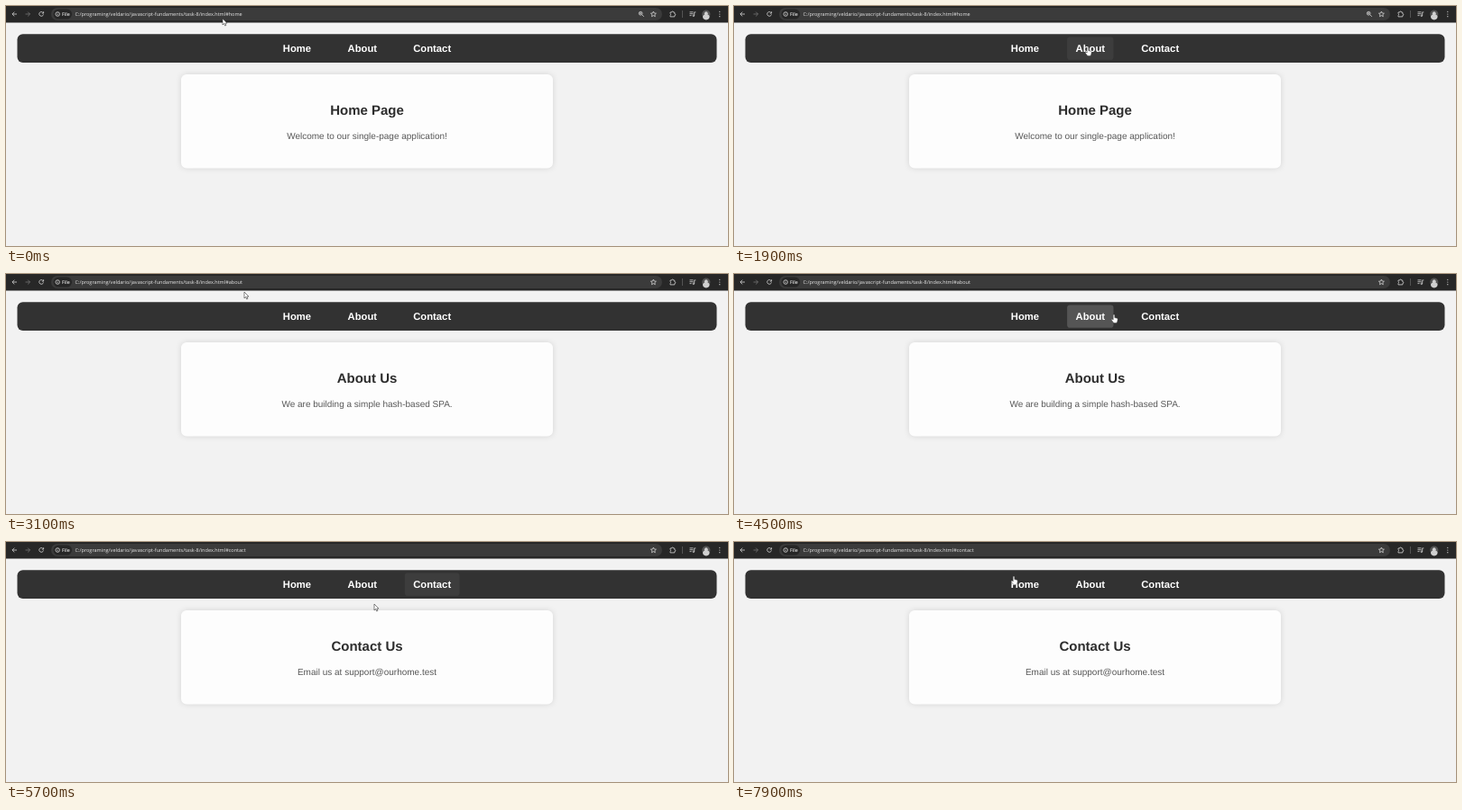
Write an HTML page that moves like this. It is 800 px wide and 267 px high and loops after 8 s.

```html
<!DOCTYPE html>
<html lang="en">
<head>
<meta charset="utf-8">
<title>Single-page application</title>
<style>
html, body { margin: 0; height: 100%; overflow: hidden; background: #f2f2f2; }
svg { display: block; width: 800px; height: 267px; text-rendering: geometricPrecision; }
text { font-family: "Liberation Sans", Arial, sans-serif; text-anchor: middle; }
.ui text { font-family: "Open Sans", "Noto Sans", sans-serif; text-anchor: start; fill: #e6e6e6; }
.icon { fill: none; stroke: #d6d6d6; stroke-width: .8; }
.link text { font-size: 11.25px; font-weight: bold; fill: #fff; }
.card { fill: #fdfdfd; filter: drop-shadow(0 0 3px rgba(0, 0, 0, .12)); }
#title { font-size: 15px; font-weight: bold; fill: #2d2d2d; }
#body { font-size: 10px; fill: #585858; }
#arrow, #hand { stroke-linejoin: round; }
</style>
</head>
<body>
<svg viewBox="0 0 800 267">
  <rect width="800" height="267" fill="#f2f2f2"/>

  <g class="ui">
    <rect width="800" height="18.5" fill="#272727"/>
    <rect x="50" y="2" width="677" height="14" rx="7" fill="#3b3b3b"/>
    <rect x="52.5" y="3.5" width="20.5" height="11" rx="5.5" fill="#262626"/>
    <text x="62" y="10.8" font-size="5.3" font-weight="600">File</text>
    <text id="url" x="76.5" y="10.9" font-size="5.54"></text>
    <g class="icon">
      <path d="M12 9H7M9.3 6.6 6.9 9l2.4 2.4"/>
      <path d="M21.5 9h5M24.2 6.6 26.6 9l-2.4 2.4" stroke="#777"/>
      <path d="M41.2 7.6A2.4 2.4 0 1 0 41.5 9.4M41.6 6.2v1.9h-1.9"/>
      <circle cx="57.2" cy="9" r="2.3"/>
      <path d="M57.2 8.7v1.6M57.2 7.5v.6"/>
      <g id="zoom"><circle cx="703.2" cy="8.2" r="1.9"/><path d="M704.6 9.6 706.8 11.8M702.2 8.2h2M703.2 7.2v2"/></g>
      <path d="m717.4 6 .9 2 2.1.2-1.6 1.4.5 2.1-1.9-1.1-1.9 1.1.5-2.1-1.6-1.4 2.1-.2z"/>
      <path d="M736 7h1.6a1 1 0 0 1 2 0h1.2v1.6a1 1 0 0 1 0 2v1.3H736v-1.6a1 1 0 0 0 0-1.8z"/>
      <path d="M749.5 5v8" stroke="#606060"/>
      <path d="M757.5 6.8h4M757.5 8.7h4M757.5 10.6h2M762.7 10.7V6.9h1.6"/>
      <circle cx="761.8" cy="10.8" r=".8"/>
    </g>
    <circle cx="775.8" cy="9" r="4.6" fill="#555"/>
    <path d="M772 11.6a3.8 3.8 0 0 0 7.6 0q-1-2-2.2-2a2 2 0 1 0-3.2 0q-1.2 0-2.2 2" fill="#d0d0d0"/>
    <path d="M790.8 6.3v.01M790.8 9v.01M790.8 11.7v.01" stroke="#ddd" stroke-width="1.2" stroke-linecap="round"/>
  </g>

  <rect x="12.5" y="31.2" width="775" height="31.8" rx="6.2" fill="#323232"/>
  <g id="nav"></g>

  <rect class="card" x="194" y="76" width="412" height="104.6" rx="6.2"/>
  <text id="title" x="400" y="120.5"></text>
  <text id="body" x="400" y="147.8"></text>

  <g id="cursor">
    <path id="arrow" d="M0 0v7l1.6-1.5 1.1 2.5 1.2-.5L2.8 5.1H5z" fill="#fff" stroke="#333" stroke-width=".6"/>
    <path id="hand" d="M-.8.6q.8-1.2 1.6 0v3l2.7.7q.8.3.7 1.2L3.7 8q-.3 1.5-1.6 1.5H.5q-.9 0-1.5-1L-2.8 6q-.2-1 .9-.8l1.1.8z" fill="#fff" stroke="#333" stroke-width=".4"/>
  </g>
</svg>
<script>
const LOOP = 8000, STEP = 100, FADE = 300;
const $ = id => document.getElementById(id);

const pages = [
  { from: 0, hash: 'home', title: 'Home Page', body: 'Welcome to our single-page application!' },
  { from: 2100, hash: 'about', title: 'About Us', body: 'We are building a simple hash-based SPA.' },
  { from: 5000, hash: 'contact', title: 'Contact Us', body: 'Email us at support@ourhome.test' }
];

// Cursor path: time, x, y
const path = [
  [0, 240, 14], [400, 258, 15], [800, 241, 15], [1200, 256, 16], [1500, 315, 26],
  [1700, 364, 34], [1800, 380, 46], [1900, 392, 46], [2200, 392, 47], [2500, 385, 44],
  [2700, 330, 28], [3100, 264, 20], [3400, 246, 15], [3800, 262, 15], [4000, 320, 28],
  [4200, 380, 42], [4500, 421, 45], [4700, 465, 47], [5200, 466, 47], [5400, 458, 50],
  [5500, 436, 58], [5700, 408, 69], [5900, 310, 66], [6100, 265, 42], [6500, 240, 23],
  [6800, 258, 15], [7100, 242, 15], [7400, 254, 19], [7700, 292, 28], [7900, 310, 38]
];

const links = [['Home', 322.5, 50], ['About', 394.8, 51.4], ['Contact', 472.2, 60.7]].map(([name, x, w]) => {
  $('nav').insertAdjacentHTML('beforeend',
    `<g class="link"><rect x="${x - w / 2}" y="34.6" width="${w}" height="25.2" rx="3.1" fill="#555"/>
     <text x="${x}" y="51">${name}</text></g>`);
  return { x, w, box: $('nav').lastElementChild.firstElementChild };
});

function cursorAt(t) {
  const i = path.findIndex(p => p[0] > t);
  if (i < 0) return path.at(-1).slice(1);
  const [a, b] = [path[i - 1], path[i]];
  const k = (t - a[0]) / (b[0] - a[0]);
  return [a[1] + (b[1] - a[1]) * k, a[2] + (b[2] - a[2]) * k];
}

const isOver = (link, [x, y]) => Math.abs(x - link.x) < link.w / 2 + 1 && y > 34.6 && y < 59.8;

// Hover fade accumulated from the cursor's history
function hoverAt(link, t) {
  let h = 0;
  for (let s = 0; s < t; s += STEP) {
    h += (isOver(link, cursorAt(s)) ? 1 : -1) * STEP / FADE;
    h = Math.min(1, Math.max(0, h));
  }
  return h;
}

function draw(now) {
  const t = Math.floor(now % LOOP / STEP) * STEP;
  const page = pages.findLast(p => p.from <= t);
  $('url').textContent = 'C:/programing/veldario/javascript-fundaments/task-8/index.html#' + page.hash;
  $('title').textContent = page.title;
  $('body').textContent = page.body;
  $('zoom').style.opacity = t < 2400 ? 1 : 0;

  const pos = cursorAt(t);
  const over = links.some(link => isOver(link, pos));
  for (const link of links) link.box.style.opacity = hoverAt(link, t);
  $('cursor').setAttribute('transform', `translate(${pos})`);
  $('arrow').style.opacity = over ? 0 : 1;
  $('hand').style.opacity = over ? 1 : 0;
}

const start = performance.now();
function tick() {
  draw(performance.now() - start);
  requestAnimationFrame(tick);
}
tick();
</script>
</body>
</html>
```
